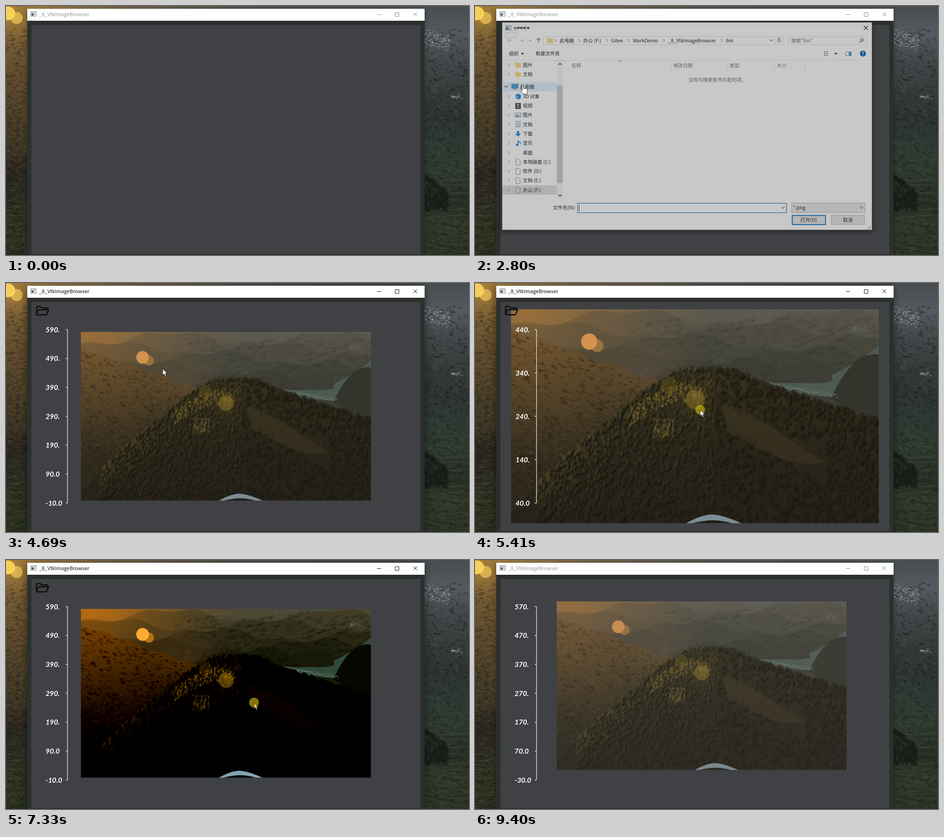
Animation of 1001 by 540 pixels, one loop 9480 ms. Source, as an HTML page with a canvas:

```html
<!DOCTYPE html>
<html lang="zh">
<head>
<meta charset="utf-8">
<title>_8_VtkImageBrowser</title>
<style>
html, body { margin: 0; width: 100%; height: 100%; overflow: hidden; background: #2b302b; }
#stage { position: absolute; left: 0; top: 0; width: 1001px; height: 540px; overflow: hidden; }
#stage > * { position: absolute; left: 0; top: 0; }
#stage #win { left: 46px; top: 6px; width: 859px; height: 560px; background: #2b302c; }
#bar { height: 26px; background: #fff; }
#stage #view { left: 55px; top: 41px; width: 841px; height: 497px; background: #404144; overflow: hidden; }
#photo { position: absolute; left: 0; top: 0; transform-origin: 0 0; }
text { font: 10.6px "Noto Sans CJK SC", "Noto Sans CJK", sans-serif; fill: #1c1c1c; white-space: pre; }
#axis text { font: italic 700 15.5px Lato, sans-serif; fill: #fff; }
.mid { text-anchor: middle; }
.dim { fill-opacity: .66; }
</style>
</head>
<body>
<div id="stage">
  <canvas id="wall" width="1001" height="540"></canvas>
  <div id="win"><div id="bar"></div></div>
  <div id="view"><canvas id="photo" width="795" height="464"></canvas></div>
  <svg id="ui" width="1001" height="540"></svg>
</div>
<script>
const $ = id => document.getElementById(id);
const rgba = (r, g, b, a = 1) => `rgba(${r | 0},${g | 0},${b | 0},${a})`;
const clamp = v => Math.max(0, Math.min(1, v));

let seed = 7;
const rnd = () => (seed = (seed * 16807) % 2147483647) / 2147483647;
const between = (a, b) => a + (b - a) * rnd();
const repeat = (n, f) => { for (let i = 0; i < n; i++) f(i / n, i); };

// Linear interpolation between key points [time, ...values]
function lerp(keys, t) {
  const i = keys.findIndex(k => t <= k[0]);
  if (i < 1) return keys.at(i).slice(1);
  const a = keys[i - 1], b = keys[i], f = (t - a[0]) / (b[0] - a[0]);
  return a.slice(1).map((v, j) => v + (b[j + 1] - v) * f);
}

function painter(canvas) {
  const c = canvas.getContext('2d');
  const blob = (x, y, rx, ry, fill, turn = 0) => {
    c.fillStyle = fill;
    c.beginPath();
    c.ellipse(x, y, rx, ry, turn, 0, 7);
    c.fill();
  };
  const poly = (fill, d) => { c.fillStyle = fill; c.fill(new Path2D(d)); };
  const glow = (x, y, r, rgb, a) => {
    const g = c.createRadialGradient(x, y, 0, x, y, r);
    g.addColorStop(0, rgba(...rgb, a));
    g.addColorStop(.5, rgba(...rgb, a * .4));
    g.addColorStop(1, rgba(...rgb, 0));
    c.fillStyle = g;
    c.fillRect(x - r, y - r, 2 * r, 2 * r);
  };
  const fade = (y0, y1, ...colors) => {
    const g = c.createLinearGradient(0, y0, 0, y1);
    colors.forEach((s, i) => g.addColorStop(i / (colors.length - 1), s));
    return g;
  };
  // Filled land below a height function
  const land = (fill, height) => {
    let d = 'M78 521';
    for (let x = 78; x <= 873; x += 3) d += `L${x} ${height(x)}`;
    poly(fill, d + 'V521Z');
  };
  return { c, blob, poly, glow, fade, land };
}

const ridge = x => x < 450 ? 182 + 243 * ((450 - x) / 305) ** 1.25 : 184 + 110 * clamp((x - 560) / 313) ** .85;

function paintPhoto() {
  const { c, blob, poly, glow, fade, land } = painter($('photo'));
  c.translate(-78, -57);
  c.fillStyle = fade(57, 300, '#5c5a4f', '#4e4c42');
  c.fillRect(78, 57, 795, 464);
  glow(100, 40, 420, [180, 120, 50], .55);
  repeat(5, (f, i) => land(rgba(74 - 5 * i, 72 - 4 * i, 62 - 4 * i, .38),
    x => 75 + 27 * i + 16 * Math.sin(x / 70 + i * 2.3) + 6 * Math.sin(x / 23 + i)));
  repeat(500, () => blob(between(330, 873), between(75, 220), between(3, 12), between(1, 4), rgba(40, 42, 36, .1), -.3));
  poly('#4c5a51', 'M873 135Q825 175 770 200T630 214L700 240L800 250Q815 200 873 170Z');
  poly('#3d3e36', 'M655 205Q675 175 700 170T770 178L772 212Q720 226 655 205Z');
  poly('#33342b', 'M770 250Q790 205 815 178T873 155V310Z');
  land(fade(85, 440, '#614d31', '#4f4129', '#3c3322', '#2d281b'), x => 100 + (x - 78) * .36 + 4 * Math.sin(x / 13));
  glow(90, 50, 330, [190, 120, 45], .3);
  glow(370, 190, 120, [140, 105, 70], .22);
  repeat(1500, f => {
    const x = between(78, 400), y = 105 + (x - 78) * .36 + f * 330;
    blob(x, y, between(2, 7), between(1, 3), rnd() < .55 ? rgba(28, 24, 15, .25) : rgba(112, 92, 58, .14), .4);
  });
  repeat(70, f => blob(640 + f * 145, 222 + f * 24 + between(-5, 4), 2.5, .9, rgba(140, 148, 146, .5)));
  repeat(25, () => blob(between(808, 848), between(94, 105), 2, .9, rgba(120, 135, 130, .5)));
  repeat(30, () => blob(between(605, 740), between(58, 68), 3, 1, rgba(90, 115, 110, .45)));

  // Wooded mountain, planted from back to front
  land(fade(180, 500, '#37311f', '#2e2a1c', '#28241a', '#26221a'), x => ridge(x) + 5);
  const slope = (x, y) => x > 535 && y > 262 + (x - 535) * .45 && y < 300 + (x - 535) * .62 && x < 760;
  repeat(3200, f => {
    const x = between(130, 873), top = ridge(x), depth = f ** 1.3, y = top + depth * (515 - top);
    if (slope(x, y)) return blob(x, y, 3, 1, rgba(72, 61, 38, .3), .5);
    const lit = (x < 520 ? .95 - depth * .8 : .3 - depth * .25) * between(.3, 1.1), r = between(2, 5.5);
    blob(x + 2, y + 3, r, r * 1.3, rgba(25, 22, 15, .45), .3);
    blob(x - 1, y, r * .6, r * 1.2, rgba(36 + 50 * lit, 33 + 43 * lit, 23 + 20 * lit, .6), .3);
  });
  poly('rgba(68,58,36,.4)', 'M535 264Q575 264 640 312T760 388Q700 400 640 372T545 320Z');
  repeat(230, () => {
    const x = between(335, 500), y = ridge(x) + between(18, 55) + (x - 335) * .15;
    blob(x, y, between(1, 2.5), between(2, 4.5), rgba(140, 116, 46, .36), .3);
  });
  repeat(60, () => blob(between(385, 430), between(292, 335), 1.8, 4, rgba(130, 108, 48, .36), .3));
  c.strokeStyle = 'rgba(78,70,44,.35)';
  repeat(18, (f, i) => c.stroke(new Path2D(`M${90 + i * 15} 521q${between(-5, 30)} -45 ${between(5, 35)} -${between(45, 85)}`)));
  glow(476, 253, 55, [140, 115, 35], .2);
  blob(420, 222, 18, 18, rgba(130, 112, 30, .25));
  blob(476, 253, 21, 21, rgba(140, 118, 42, .5));
  blob(264, 136, 14, 14, rgba(190, 135, 62, .6));
  blob(247, 127, 17.5, 17.5, rgba(216, 150, 78, .95));
  poly('#7c8d95', 'M456 521Q490 502 512 502T576 521H556Q515 508 470 521Z');
}

function paintWall() {
  const { c, blob, glow, fade } = painter($('wall'));
  const g = c.createLinearGradient(0, 0, 1001, 0);
  ['#a5803f', '#6f6149', '#52524c', '#484d4e', '#4a5054'].forEach((s, i) => g.addColorStop(i / 4, s));
  c.fillStyle = g;
  c.fillRect(0, 0, 1001, 8);
  c.fillStyle = fade(0, 540, '#917039', '#7d6136', '#685230', '#5a482d', '#4a3f29', '#3f3726', '#292620', '#2c2d24', '#2b3122', '#2a3022');
  c.fillRect(0, 0, 48, 540);
  c.fillStyle = fade(0, 540, '#484d50', '#545a60', '#414648', '#373c3d', '#2d3431', '#2e3933', '#2f3a2f', '#282f26', '#2f3829', '#2b3226');
  c.fillRect(903, 0, 98, 540);
  repeat(900, f => {
    const y = 50 + f * 490;
    blob(between(0, 46), y, between(2, 5), between(1, 2.5), rnd() < .55 ? rgba(26, 23, 14, .22) : rgba(130, 105, 62, .12));
    blob(between(905, 1001), y, between(2, 5), between(1, 2.5), rnd() < .55 ? rgba(22, 26, 24, .3) : rgba(100, 112, 100, .13), .4);
  });
  repeat(120, f => blob(905 + f * 55, between(50, 84) + f * 14, between(1, 2.5), .9, rgba(168, 178, 188, .5)));
  repeat(14, () => blob(between(964, 986), between(193, 202), 3, 1, rgba(150, 158, 164, .55)));
  repeat(28, (f, i) => {
    c.strokeStyle = i % 2 ? 'rgba(105,116,80,.3)' : 'rgba(18,24,16,.4)';
    c.stroke(new Path2D(`M1001 ${350 + i * 8}q-40 ${between(-8, 12)} -96 ${between(-30, 20)}`));
    if (i < 13) c.stroke(new Path2D(`M0 ${428 + i * 9}q25 ${between(-6, 6)} 46 ${between(-10, 5)}`));
  });
  repeat(170, f => blob(903 + f * 52, between(360 + f * 40, 445), between(2, 5), between(3, 6), rgba(24, 28, 23, .5)));
  glow(8, 18, 60, [220, 165, 60], .35);
  blob(23, 26, 13, 13, rgba(226, 186, 84, .85));
  blob(4, 16, 16, 15, rgba(250, 212, 92, .95));
}

// SVG helpers; text is placed by its vertical middle
const txt = (x, y, s, more = '') => `<text x="${x}" y="${y + 4}" ${more}>${s}</text>`;
const mid = (x, y, s) => txt(x, y, s, 'class="mid"');
const box = (x, y, w, h, fill, more = '') => `<rect x="${x}" y="${y}" width="${w}" height="${h}" fill="${fill}" ${more}/>`;
const frame = (x, y, w, h, color, fill = 'none', thick = 1) => box(x, y, w, h, fill, `stroke="${color}" stroke-width="${thick}"`);
const line = (d, color = '#555', w = 1.2, more = '') => `<path d="${d}" fill="none" stroke="${color}" stroke-width="${w}" ${more}/>`;
const shape = (d, fill) => `<path d="${d}" fill="${fill}"/>`;
const group = (id, body) => `<g id="${id}">${body}</g>`;
const chevron = (x, y, color = '#777') => line(`M${x - 2} ${y - 3.5}l3.5 3.5 -3.5 3.5`, color, 1);
const down = (x, y) => line(`M${x - 3.5} ${y - 2}l3.5 3.5 3.5 -3.5`);
const appIcon = (x, y) => frame(x + .5, y + .5, 12, 10, '#8c949b', '#f4f6f7') +
  box(x + 1, y + 1, 11, 2, '#b9c6d0') + box(x + 2, y + 4, 5, 5, '#526270') + box(x + 8, y + 4, 3, 5, '#c4d2cc');

// Sidebar icons, centred on (88, 0)
const icons = {
  folder: shape('M82 -6h5l1 2h6v10h-12z', '#f7d774'),
  cube: shape('M82 -3l6 -3 6 3v7l-6 3 -6 -3z', '#1d86d0') + shape('M82 -3l6 3v7l-6 -3z', '#6dc0f2'),
  film: box(82, -6, 12, 13, '#3a3f46') + box(85, -4, 6, 4, '#7fa4c8') + box(85, 1, 6, 4, '#b88a60'),
  pic: frame(81.5, -4.5, 13, 9, '#7e8a92', '#e8f2f8') + shape('M83 3l3 -4 3 2 4 2z', '#3f7f9f'),
  doc: frame(83.5, -6.5, 9, 12, '#6e8aa0', '#fff') + line('M85 -3h6m-6 3h6m-6 3h6', '#3b88c4', 1),
  get: shape('M85.5 -6h5v6h4l-6.5 6.5 -6.5 -6.5h4z', '#2b88d8'),
  note: line('M88 4v-10q1 3 5 5v3', '#1c86e0', 1.8) + '<circle cx="86" cy="4" r="2.7" fill="#1c86e0"/>',
  desktop: box(81, -5, 13, 10, '#1487d8') + box(82, 3, 11, 1, '#0b4c86'),
  drive: shape('M82 1l2 -2h8l2 2z', '#b9bdc0') + box(81, 1, 14, 4, '#5d6266') + box(91, 2, 2, 1, '#6fdc6f'),
  blank: line('M83.5 -6h6l3 3v10h-9z', '#888', 1)
};
const icon = (name, y, dx = 0) => `<g transform="translate(${dx} ${y})">${icons[name]}</g>`;
const places = ['图片 folder', '文档 folder', '3D 对象 cube', '视频 film', '图片 pic', '文档 doc', '下载 get', '音乐 note',
  '桌面 desktop', '本地磁盘 (C:) drive', '软件 (D:) drive', '文档 (E:) drive', '办公 (F:) drive'].map((s, i) => {
  const cut = s.lastIndexOf(' ');
  return { name: s.slice(0, cut), icon: s.slice(cut + 1), y: 126 + 20.55 * i + (i > 1 ? 28 : 0) };
});
const late = places.slice(8);
const crumbs = list => list.map(([x, s]) => chevron(x - 9, 72, '#555') + txt(x, 72, s)).join('');

const sidebar = places.map(p => chevron(68, p.y) + txt(98.5, p.y, p.name)).join('') +
  places.slice(0, 8).map(p => icon(p.icon, p.y)).join('') +
  line('M58.5 172l3.5 3.5 3.5 -3.5', '#444') + txt(92, 174, '此电脑') +
  frame(74, 168, 14, 9, '#62717c', '#3f9bdc') + box(78, 178, 6, 2, '#75828c') +
  box(173, 116, 14, 303, '#f1f1f1') + box(173, 171, 13, 215, '#c9c9c9') +
  line('M176.5 126l3.5 -3.5 3.5 3.5M176.5 411l3.5 3.5 3.5 -3.5', '#333', 1.5);

const binView = group('bin',
  shape('M152 66h5l1 2h6v10h-12z', '#f3d27a') +
  crumbs([[179, '此电脑'], [231, '办公 (F:)'], [292, 'Gitee'], [339.5, 'WorkDemo'], [417, '_8_VtkImageBrowser'], [544, 'bin']]) +
  txt(687, 72, '搜索"bin"', 'class="dim"') +
  [[205, '名称'], [428.5, '修改日期'], [552, '类型'], [655.5, '大小']].map(([x, s]) => txt(x, 127, s, 'class="dim"')).join('') +
  line('M422.5 116v24M547.5 116v24M649.5 116v24M717.5 116v24', '#dedede', 1) +
  line('M308 119l3.5 -3 3.5 3', '#666', 1) +
  txt(525, 159, '没有与搜索条件匹配的项。', 'class="mid dim"') +
  late.slice(1).map(p => icon('blank', p.y)).join('') +
  line('M759 97h3m-3 4h3m-3 4h3m2 -8h3m-3 4h3m-3 4h3', '#777', 2) +
  line('M65 72h10m-10 0l4 -4m-4 4l4 4', '#bbb') + line('M222 434v13', '#222', 1));

const deskView = group('desk',
  box(147, 67, 13, 10, '#1487d8') + crumbs([[179, '此电脑'], [232, '桌面']]) +
  txt(688, 72, '搜索"桌面"', 'class="dim"') +
  late.map(p => icon(p.icon, p.y)).join('') + box(81, 334, 5, 5, '#2a8fd6') +
  line('M65 72h10m-10 0l4 -4m-4 4l4 4', '#444') + icon('pic', 101, 678) +
  box(203, 121, 90, 101, '#e5f3ff', 'id="hoverWork"') +
  shape('M221 132h22l4 4h16v64h-42z', '#f3d583') +
  shape('M249 142l24 -4v62l-24 5z', '#fafafa') + line('M257 148l14 -2v35l-14 2M257 192l14 -2', '#444', 2) +
  txt(257, 165, 'G', 'style="font-size:27px;font-style:italic"') +
  shape('M236 137l22 12v58l-22 -6z', '#fff') + shape('M221 132l15 8v64l-15 -7z', '#fbe3a0') +
  box(239.5, 164, 4, 10, '#555') + line('M236 138v64', '#e4c878', 1) + mid(247, 212, 'work') +
  box(297, 121, 90, 101, '#cce8ff', 'id="hoverPng"') +
  box(303, 158, 78, 46, '#c8c8c8') + box(302, 157, 78, 45, 'url(#thumb)') +
  shape('M302 186Q325 166 340 169T380 186V202H302Z', '#2b281c') + mid(342, 212, '你好.png') +
  group('picked', txt(223, 440, '你好.png')));

const dialog = group('dialog',
  box(53, 32, 811, 457, '#fcfcfc', 'stroke="#4a4a4a" style="filter:drop-shadow(0 3px 6px rgba(0,0,0,.6))"') +
  appIcon(60, 39) + txt(78, 44, 'w') + txt(104, 44, '|') +
  [86, 92, 98, 107].map(x => txt(x, 43, '\uFFFD', 'style="font:6.5px DejaVu Sans,sans-serif"')).join('') +
  line('M846 40l9 9m0 -9l-9 9', '#111') +
  line('M90 72h10m0 0l-4 -4m4 4l-4 4', '#c0c0c0') + line('M113 71l2 2 2 -2', '#888') +
  line('M133 77v-10m0 0l-4 4m4 -4l4 4', '#444') +
  frame(143.5, 63.5, 526, 18, '#d9d9d9') + line('M652.5 64v17', '#d9d9d9', 1) + down(643, 72) +
  line('M664 70a3.5 3.5 0 1 1 -4 -2l2 -1m-2 1l2 2') + frame(680.5, 63.5, 172, 18, '#d9d9d9') +
  '<circle cx="842" cy="71" r="3" fill="none" stroke="#555" stroke-width="1.3"/>' + line('M840 73l-4 4') +
  txt(68, 101, '组织') + txt(126.5, 101, '新建文件夹') + shape('M94 99.5h7l-3.5 4zM781 99.5h7l-3.5 4z', '#333') +
  frame(806.5, 97.5, 12, 8, '#5d7a90', '#fff') + box(813, 98, 5, 7, '#3c8fcf') +
  '<circle cx="844" cy="101" r="6.5" fill="#0063b1"/>' + txt(844, 101, '?', 'class="mid" style="fill:#fff;font-weight:700"') +
  line('M54 115.5h809', '#e4e4e4', 1) +
  box(54, 308, 119, 20, '#cce8ff', 'id="row"') + box(54, 164, 119, 20, '#dceefb', 'id="hoverPc"') +
  sidebar + binView + deskView +
  txt(214, 440, '文件名(N):', 'text-anchor="end"') +
  frame(218.5, 430, 458, 21, '#2c6a9c', 'none', 1.2) + down(669, 440) +
  frame(687.5, 429.5, 161, 21, '#adadad', '#e4e4e4') + txt(691, 440, '*.png') + down(841, 440) +
  frame(689, 457, 73, 20, '#0e6fc0', '#e2e2e2', 2) + mid(725, 467, '打开(O)') +
  frame(774.5, 456.5, 73, 20, '#adadad', '#e2e2e2') + mid(811, 467, '取消') +
  line('M854 487l7 -7m-4 7l4 -4', '#aaa'));

const hand = 'M0 0q2 -1 2.5 1l.5 6q2 -1 3 .5 2 -1 3 .7 2 -.6 2.3 1.5v4q0 4 -2 5.5h-7q-2 -3 -5 -7.5 0 -2 3 -.5l-.8 -10q0 -1 .5 -1.2z';
const arrow = 'M0 0v13.5l3 -2.7 2.2 5 2.3 -1 -2.2 -4.8h4.2z';

$('ui').innerHTML =
  '<defs><linearGradient id="thumb" x2="1" y2=".3"><stop stop-color="#685638"/><stop offset="1" stop-color="#404337"/></linearGradient></defs>' +
  appIcon(53, 12) + txt(71, 18, '_8_VtkImageBrowser', 'id="title" style="font-size:11px"') +
  line('M802 18.5h9M841.5 14.5h8v8h-8zM881 14l8 8m0 -8l-8 8', '#111', 1, 'id="buttons"') +
  group('axis', '') +
  line('M66 67V53q0 -2 2 -2h6l3 3h11q2 0 2 3M66 67l4.5 -9h21.5l-3.5 9q-1 2 -3 2h-17q-2.5 0 -2.5 -2z', '#0b0b0b', 2.4, 'id="folder" stroke-linejoin="round"') +
  dialog +
  '<circle id="press" r="10.5" fill="#c8b20c" fill-opacity=".66"/><path id="cursor" stroke="#222" stroke-width=".9"/>';

// The screen refreshes in bursts of seven
const bursts = [0, 150, 1400, 2650, 3750, 4940, 6040, 7160, 8300, 9400];
function tick(t) {
  const start = bursts.findLast(b => b <= t);
  return start && start + 157 * Math.min(6, Math.floor((t - start + 8) / 157));
}

// Cursor: [time, x, y]
const path = [[320, 605, 522], [1170, 90, 74], [2410, 82, 66], [2807, 102, 172], [3278, 106, 316], [3590, 108, 318],
  [4064, 236, 196], [4221, 325, 182], [4690, 338, 186], [4940, 450, 215], [5411, 487, 275], [5880, 490, 345],
  [6511, 554, 256], [7317, 536, 309], [7800, 500, 250], [8457, 534, 227], [8771, 560, 545]];
const contrast = [[6511, 0], [7317, 1], [7800, -.17]];
const pan = [[7800, 0, 0], [8140, -4, -20], [8457, 34, -23], [8614, 14.5, -16.5]];

const within = (t, ...spans) => spans.some(([a, b]) => t >= a && t < b);
const show = (id, on) => $(id).style.display = on ? '' : 'none';

function drawAxis(w, dy) {
  const close = w > 750;
  const top = close ? 440 : 590 + Math.round(dy * .14) * 10, n = close ? 4 : 6;
  let s = line('M133 101V477', '#e8e8e8', 1.3);
  for (let i = 0; i <= n; i++) {
    const y = 101 + 376 * i / n, v = top - 100 * i;
    s += line(`M129 ${y}h4`, '#e8e8e8', 1.3) + txt(close ? 87.5 : 85.5, y + 1.5, v >= 100 ? v + '.' : v.toFixed(1));
  }
  $('axis').innerHTML = s;
}

function drawPhoto(t) {
  const zoom = Math.sin(Math.PI * Math.sqrt(clamp((t - 4700) / 1180)));
  const w = 627 + 260 * zoom, k = w / 795, [dx, dy] = lerp(pan, t), [s] = lerp(contrast, t);
  const gain = 1 + .75 * s, c = 1 + .66 * s;
  $('photo').style.transform = `translate(${420.5 + dx - w / 2}px,${248 + dy - 232 * k}px) scale(${k})`;
  $('photo').style.filter = `brightness(${gain / c}) contrast(${c})`;
  drawAxis(w, dy);
}

function drawDialog(t) {
  const desk = t > 3580, opening = clamp((t - 2430) / 520), closing = clamp((t - 4400) / 250);
  const alpha = opening * (1 - closing), k = 1 - .05 * (1 - alpha);
  $('dialog').setAttribute('opacity', alpha);
  $('dialog').setAttribute('transform', `translate(458.5 260.5) scale(${k}) translate(-458.5 -260.5)`);
  show('bin', !desk);
  show('desk', desk);
  show('hoverPc', t < 2950);
  show('hoverWork', within(t, [3900, 4200]));
  show('hoverPng', t > 4200);
  show('picked', t > 4370);
  $('row').setAttribute('y', desk ? 308 : 391);
  $('row').setAttribute('fill', desk ? '#cce8ff' : '#d9d9d9');
}

let last = -1;
function render(now) {
  requestAnimationFrame(render);
  const t = tick(now % 9480);
  if (t === last) return;
  last = t;

  const active = within(t, [1730, 2330], [4680, 9400]);
  $('title').style.fill = active ? '#111' : '#999';
  $('buttons').style.stroke = active ? '#111' : '#888';
  $('win').style.boxShadow = `0 3px ${active ? 16 : 9}px rgba(0,0,0,${active ? .5 : .35})`;

  const used = within(t, [300, 9400]), loaded = t >= 4680, open = within(t, [2640, 4680]);
  show('folder', used);
  show('photo', loaded);
  show('axis', loaded);
  show('dialog', open);
  if (loaded) drawPhoto(t);
  if (open) drawDialog(t);

  const [x, y] = lerp(path, t), at = `translate(${x} ${y})`;
  show('cursor', used);
  $('cursor').setAttribute('d', within(t, [1390, 2950]) ? hand : arrow);
  $('cursor').setAttribute('transform', at);
  $('cursor').setAttribute('fill', within(t, [6030, 8200]) ? '#f3b673' : '#fff');
  show('press', within(t, [1700, 1860], [3420, 3580], [4370, 4520], [4930, 5870], [6660, 7800], [7940, 8610]));
  $('press').setAttribute('transform', at);
}

paintPhoto();
paintWall();
requestAnimationFrame(render);
</script>
</body>
</html>
```
